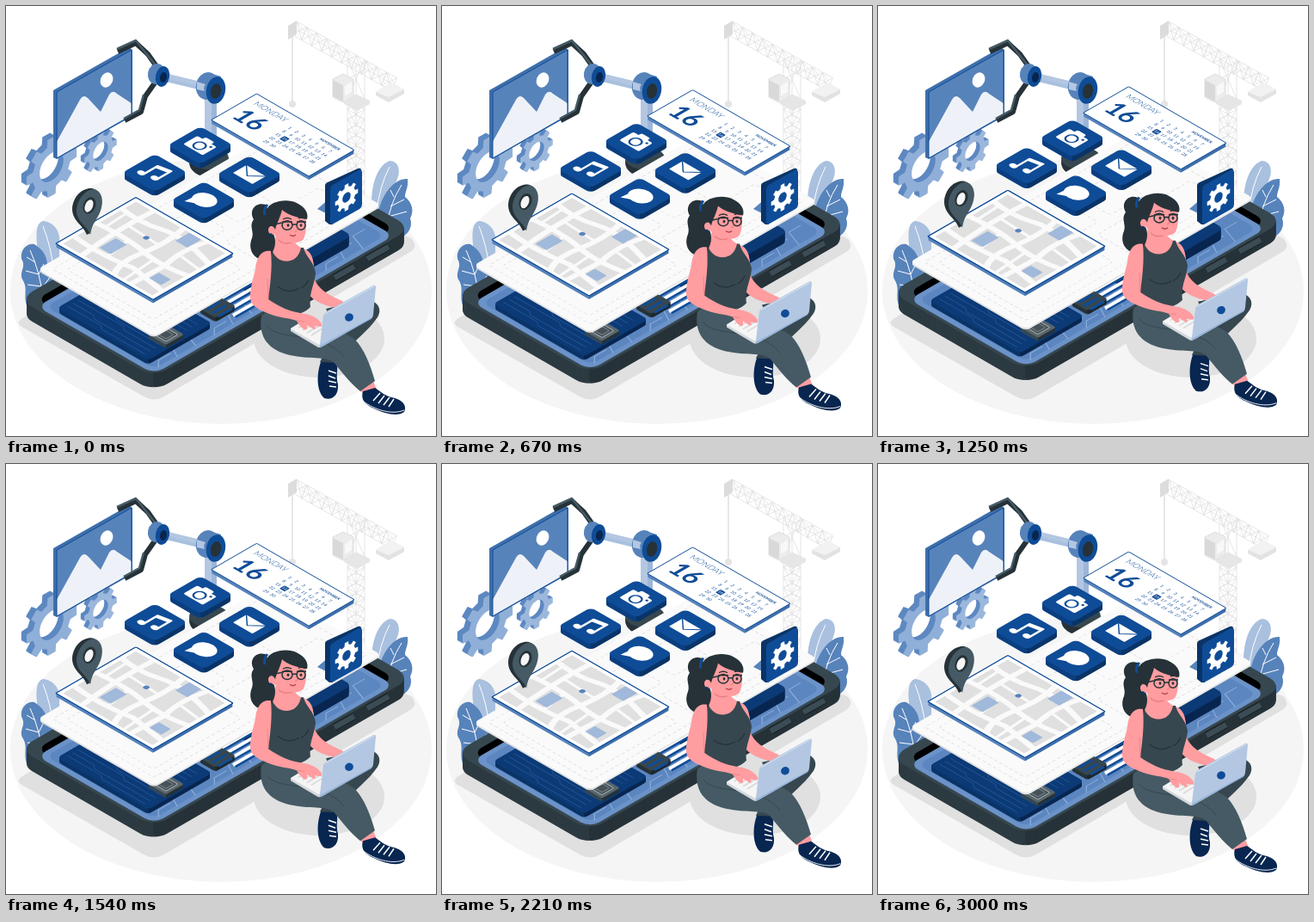
Write an HTML page with a canvas that moves like this. It is 500 by 500 pixels and loops after 3040 ms.

```html
<!DOCTYPE html>
<html lang="en">
<head>
<meta charset="utf-8">
<title>App development</title>
<style>
html, body { margin: 0; width: 100%; height: 100%; overflow: hidden; background: #fff; }
canvas { display: block; width: 500px; height: 500px; }
</style>
</head>
<body>
<canvas id="stage"></canvas>
<script>
const LOOP = 3040, FLOAT = 3000, LIFT = 10;
const NAVY = '#0f4c97', BOARD = '#0b3a76', DEEP = '#0a3467', INK = '#082650', MID = '#5783bb', PALE = '#b3c7e2';
const SLATE = '#37474f', COAL = '#263238', STONE = '#455a64', SKIN = '#ff9da0', GREY = '#e0e0e0';
const TOP = [.866, .5, -.866, .5], WALL = [.866, -.5, 0, 1];

const canvas = document.getElementById('stage');
const c = canvas.getContext('2d');
const dpr = window.devicePixelRatio || 1;
canvas.width = canvas.height = 500 * dpr;

function shape(d, fill, stroke, width = 1) {
  const p = new Path2D(d);
  if (fill) { c.fillStyle = fill; c.fill(p); }
  if (stroke) { c.strokeStyle = stroke; c.lineWidth = width; c.stroke(p); }
}
const line = (d, color, width) => shape(d, null, color, width);

function oval(x, y, rx, ry, fill, tilt = 0, stroke, width = 1) {
  c.beginPath();
  c.ellipse(x, y, rx, ry, tilt, 0, 7);
  if (fill) { c.fillStyle = fill; c.fill(); }
  if (stroke) { c.strokeStyle = stroke; c.lineWidth = width; c.stroke(); }
}

function rect(x, y, w, h, r, fill, stroke, width = 1) {
  c.beginPath();
  c.roundRect(x, y, w, h, r);
  if (fill) { c.fillStyle = fill; c.fill(); }
  if (stroke) { c.strokeStyle = stroke; c.lineWidth = width; c.stroke(); }
}

function plane(m, x, y, draw) {
  c.save();
  c.transform(...m, x, y);
  draw();
  c.restore();
}

// Isometric box; x, y is the far corner of its upper face.
function slab(x, y, w, h, r, depth, top, left, right, edge) {
  const split = x + .866 * (w - h);
  [[left, -100, split + 100], [right, split, 600 - split]].forEach(([fill, from, width]) => {
    c.save();
    c.beginPath();
    c.rect(from, 0, width, 600);
    c.clip();
    for (let k = depth; k > 0; k--) plane(TOP, x, y + k, () => rect(0, 0, w, h, r, fill));
    c.restore();
  });
  plane(TOP, x, y, () => rect(0, 0, w, h, r, top, edge));
}

function gearPath(r, teeth, hole) {
  const p = new Path2D(), step = Math.PI * 2 / teeth;
  for (let i = 0; i < teeth; i++) {
    [[-.3, .76], [-.2, 1], [.2, 1], [.3, .76]].forEach(([o, k]) => {
      const a = (i + o) * step;
      p.lineTo(Math.cos(a) * r * k, Math.sin(a) * r * k);
    });
  }
  p.closePath();
  p.moveTo(hole, 0);
  p.arc(0, 0, hole, 0, 7);
  return p;
}

function gear(x, y, r, teeth, hole, depth, face, side) {
  const p = gearPath(r, teeth, hole);
  for (let k = depth; k >= 0; k--) {
    plane(WALL, x - k * .87, y - k * .5, () => {
      c.fillStyle = k ? side : face;
      c.fill(p, 'evenodd');
    });
  }
}

function crane() {
  let d = '';
  for (let i = 0; i < 10; i++) {
    const x = 338 + i * 11.6, y = 18 + i * 6.6;
    d += `M${x} ${y}l-6 15 17.6 -8.4M${x} ${y}l5.6 21.6 6 -15M${x} ${y}l8 11`;
  }
  d += 'M338 18L455 84M332 33L449 99M341 29L455 94';
  for (let y = 108; y < 222; y += 12) d += `M397 ${y}l10 6 10 -6 -10 -5zl10 18 10 -18M397 ${y + 12}l10 -6 10 6`;
  d += 'M397 62V222M407 66V226M417 62V222M397 62L417 108M417 62L397 108M397 85L417 74';
  line(d, '#e0e0e0', .8);
  shape('M328 23l10 -6v16l-10 6z', '#dcdcdc');
  line('M333 36V111', '#d8d8d8', 1.2);
  oval(333, 114, 4, 4, '#e4e4e4');
  shape('M380 85l12 -6 12 6v20l-12 7 -12 -6z', '#ececec', '#dedede');
  shape('M380 86l12 6v19l-12 -6z', '#d9d9d9');
  shape('M394 93l8 -5v12l-8 5z', '#f8f8f8');
  shape('M393 111l15 -8 15 7v4l-15 8 -15 -8z', '#e6e6e6');
  shape('M430 100l18 -11 15 8v5l-18 10 -15 -8z', '#e2e2e2');
  shape('M430 100l18 -11 15 8 -18 9z', '#f2f2f2');
}

function picture() {
  gear(53, 187, 34, 8, 16, 7, '#8fafd8', '#5d88c1');
  gear(110, 169, 22, 8, 10, 5, '#9bb7dc', '#5d88c1');
  shape('M55 98L143 48 147 51V128L59 178 55 176Z', '#3e6fab');
  shape('M59 100L146 51V127L59 177Z', MID);
  c.save();
  c.clip(new Path2D('M59 100L146 51V127L59 177Z'));
  shape('M55 165L86 109Q90 102 95 107L110 123 120 103Q124 97 129 102L150 116V132L59 182Z', '#eef2f8');
  c.restore();
  line('M59 100L146 51V127L59 177Z', NAVY, 1);
  oval(117, 86, 7, 9, '#fff', .45);
}

function arm() {
  shape('M231 108L245 112V184H231Z', PALE);
  shape('M239 110L245 112V184H239Z', '#9db6d8');
  oval(236, 182, 23, 17, COAL);
  oval(236, 177, 23, 13, SLATE);
  c.lineJoin = 'round';
  line('M130 53L151 43 165 56 177 73', COAL, 6);
  line('M129 50L151 40 174 69', STONE, 2.5);
  line('M138 133L157 123 162 105 174 88', COAL, 6);
  line('M137 131L155 121 160 103', STONE, 2.5);
  line('M185 83L235 95', '#a9c0df', 9);
  line('M186 81L235 93', PALE, 5);
  oval(175, 79, 10, 12, MID, .2);
  oval(182, 82, 8, 12, NAVY, .2);
  oval(183, 83, 4, 6, INK, .2);
  oval(234, 93, 13, 16, MID, .2);
  shape('M237 78L250 82 247 113 232 108Z', MID);
  oval(244, 98, 11, 16, NAVY, .2);
  oval(244, 99, 6, 9, COAL, .2);
  shape('M222 88L232 91Q229 95 231 99L222 97Z', PALE);
}

function leaves() {
  shape('M38 290C34 268 34 251 44 250C56 252 64 262 62 276V310H50Z', '#a9c0df');
  line('M43 256Q52 278 56 310', '#fff');
  shape('M24 348C20 336 26 328 19 318C15 308 24 304 18 294C16 282 26 275 33 277C44 284 48 292 48 302C58 306 60 320 58 345Z', MID);
  line('M28 284Q40 310 44 345M34 298L24 292M38 312L23 308M41 326L25 324M38 312L44 300M42 328L52 314', '#fff');
  shape('M425 235C424 208 432 185 446 180C457 180 459 192 455 201C451 213 440 222 436 240Z', '#a9c0df');
  line('M446 187Q434 210 431 240', '#fff');
  shape('M432 245C436 218 452 200 467 201C468 212 464 215 464 222C472 228 475 238 470 247C473 256 469 263 462 268L440 255Z', MID);
  line('M460 208Q446 230 443 256M451 222L447 214M447 233L463 225M444 245L466 239', '#fff');
}

function phone() {
  slab(315, 167.8, 181, 346.5, 18, 17, SLATE, '#2c3a41', COAL);
  line('M382 316L405 303M420 294L445 280', '#1c262b', 9);
  line('M382 316L405 303M420 294L445 280', '#3c4c54', 6.5);

  c.save();
  plane(TOP, 315, 179.8, () => {
    rect(0, 0, 157, 322.5, 12, '#000');
    c.clip();
  });
  plane(TOP, 315, 188.5, () => {
    rect(0, 0, 157, 322, 12, '#6b93c9');
    rect(6, 6, 145, 310, 10, '#5c86c0');
    c.beginPath();
    for (let i = 0; i < 12; i++) {
      c.moveTo(130 + i % 3 * 7, 12 + i * 25);
      c.lineTo(130 + i % 3 * 7, 28 + i * 25);
      c.lineTo(152, 36 + i * 25);
    }
    c.strokeStyle = '#8fb0da';
    c.lineWidth = 1;
    c.stroke();
  });
  slab(134, 308, 122, 86, 5, 5, BOARD, DEEP, INK);
  plane(TOP, 134, 308, () => {
    c.beginPath();
    for (let i = 0; i < 11; i++) {
      const v = 7 + i * 7, bend = 30 + i * 17 % 50;
      c.moveTo(5, v);
      c.lineTo(bend, v);
      c.lineTo(bend + 5, v + 4);
      c.lineTo(113, v + 4);
    }
    c.strokeStyle = '#24579b';
    c.lineWidth = .8;
    c.stroke();
  });
  slab(352, 238, 58, 125, 7, 11, BOARD, DEEP, INK);
  for (let i = 0; i < 4; i++) {
    const x = 240 + i * 8, y = 346 + i * 4.6;
    line(`M${x} ${y}l75 -43`, '#fff', 4);
    line(`M${x + 3} ${y + 1.8}l75 -43`, NAVY, 2.4);
  }
  slab(248, 338, 22, 27, 3, 5, SLATE, COAL, '#1d272c');
  for (let i = 0; i < 3; i++) line(`M${233 + i * 7} ${353 + i * 4}l16 -9`, NAVY, 3);
  slab(186, 370, 24, 24, 2, 4, '#59666c', SLATE, COAL);
  plane(TOP, 186, 370, () => {
    rect(4, 4, 16, 16, 1, '#465258', '#b8c0c4', .8);
    rect(7, 7, 10, 10, 1, null, '#8f999e', .7);
  });
  c.restore();
}

function sheet() {
  slab(301, 153.5, 156, 305, 6, 2, '#fafafa', GREY, '#e6e6e6');
  plane(TOP, 301, 153.5, () => {
    c.setLineDash([4, 3]);
    rect(10, 10, 136, 285, 3, null, '#dedede', .9);
    rect(20, 168, 116, 118, 3, null, '#dedede', .9);
    rect(94, 22, 42, 125, 3, null, '#dedede', .9);
    [[34, 70], [34, 132]].forEach(([u, v]) => rect(u, v, 46, 46, 4, null, '#dedede', .9));
    c.setLineDash([]);
  });
}

function map() {
  const x = 151, y = 222.5;
  slab(x, y, 130.5, 107.5, 1, 4, '#fff', MID, '#3e6fab', NAVY);
  plane(TOP, x, y, () => {
    rect(5, 5, 120, 98, 1, GREY);
    c.clip();
    line('M0 22Q30 28 54 20T131 30M0 57Q40 52 68 58T131 55M0 86Q38 92 80 84L131 92M28 0Q24 50 32 108M67 0Q75 30 69 60T78 108M101 0Q91 30 99 60L97 108', '#fafafa', 6.5);
    line('M28 38L70 40M45 57L50 90M99 38L130 42M12 22L14 57M84 57L88 108', '#fafafa', 3.5);
    rect(34, 61, 15, 22, 1, '#a1b9da');
    rect(77, 5, 16, 19, 1, '#a1b9da');
    rect(103, 72, 16, 13, 1, '#a1b9da');
    oval(54, 40, 3, 3, MID);
  });
  plane(TOP, x, y, () => rect(0, 0, 130.5, 107.5, 1, null, NAVY, 1.2));
}

function pin() {
  shape('M94 266C90 255 77 250 77 236C78 220 90 211 100 212C110 214 113 226 110 236C106 248 100 252 98 264Z', COAL);
  shape('M98 266C95 256 82 251 82 238C83 223 94 213 102 213C112 215 114 227 110 238C106 249 100 252 98 266Z', STONE);
  oval(97, 232, 7, 10, COAL, .4);
  oval(96.5, 232.5, 4.5, 7.5, '#f5f5f5', .4);
}

function tile(x, y, icon) {
  slab(x, y - 22, 44, 44, 6, 6, NAVY, '#0b3f80', DEEP);
  plane(TOP, x, y, icon);
}

function icons() {
  tile(226, 162, () => {
    rect(-13, -9, 26, 19, 2, '#fff');
    rect(-6, -13, 12, 6, 2, '#fff');
    oval(0, 1, 7, 7, NAVY);
    oval(0, 1, 5, 5, '#fff');
    oval(9, -5, 1.5, 1.5, NAVY);
  });
  tile(173, 194, () => {
    line('M-6 9V-10L9 -13V6', '#fff', 2.6);
    line('M-6 -8L9 -11', '#fff', 4);
    oval(-9, 9, 4.5, 3.5, '#fff');
    oval(6, 6, 4.5, 3.5, '#fff');
  });
  tile(283, 196, () => {
    rect(-13, -9, 26, 18, 1, '#fff');
    line('M-13 -9L0 3 13 -9', NAVY, 1.2);
  });
  tile(230, 226, () => {
    oval(0, -1, 13, 11, '#fff');
    shape('M-11 4L-12 14 -2 9Z', '#fff');
  });
}

function label(text, x, y, size, weight = 400, align = 'left', color = NAVY) {
  c.font = `${weight} ${size}px Lato, sans-serif`;
  c.textAlign = align;
  c.fillStyle = color;
  c.fillText(text, x, y);
}

function calendar() {
  slab(291.5, 102, 131, 61, 1, 4, '#fff', MID, '#3e6fab', NAVY);
  c.textBaseline = 'middle';
  plane(TOP, 330, 142, () => {
    for (let day = 1; day <= 30; day++) {
      const u = (day - 1) % 7 * 9, v = Math.floor((day - 1) / 7) * 8;
      if (day === 16) rect(u - 3.5, v - 3.5, 7, 7, 1, NAVY);
      label(day, u, v, 5.2, 400, 'center', day === 16 ? '#fff' : NAVY);
    }
  });
  plane(TOP, 283, 133, () => label('16', 0, 0, 29, 700, 'center'));
  c.textBaseline = 'alphabetic';
  plane(TOP, 364, 155, () => label('NOVEMBER', 0, 0, 4.6, 700));
  plane(TOP, 287, 114, () => label('MONDAY', 0, 0, 9.6, 300));
}

function settings() {
  shape('M362 236L376 224V242L370 240Z', MID);
  shape('M371 209Q371 206 374 205L409 189Q413 188 413 191L380 214V254L376 254 371 250Z', DEEP);
  shape('M377 213Q377 210 380 208L410 191Q414 190 414 193V231Q414 234 411 236L381 253Q377 255 377 251Z', NAVY);
  gear(396, 222.5, 15.5, 8, 5.5, 0, '#fff');
}

function head() {
  shape('M302 231C290 227 282 238 288 248C282 256 289 262 286 270C280 284 290 297 302 294C314 288 316 270 309 262C304 250 307 240 302 231Z', COAL);
  shape('M309 246C310 236 330 232 347 240C350 250 350 262 346 271C341 277 330 276 322 272C314 270 310 264 309 258Z', SKIN);
  shape('M303 237C306 227 327 223 338 229C348 234 352 241 350 248C338 246 326 242 321 237C319 246 315 252 313 260C304 256 298 247 303 237Z', COAL);
  line('M304 231Q299 236 301 243', NAVY, 3);
  oval(309, 261, 4, 5, SKIN, -.2);
  oval(308, 266, 1.8, 1.8, DEEP);
  line('M322 248Q327 245 332 248M340 247Q344 245 348 247', COAL, 1.4);
  oval(327, 255, 6, 5.3, null, 0, COAL, 1.5);
  oval(343, 255, 5, 5.2, null, 0, COAL, 1.5);
  line('M312 254L321 252M321 251H333M333 254H338M338 251H349', COAL, 1.6);
  oval(328, 255, 1.4, 1.8, COAL);
  oval(343, 255, 1.4, 1.8, COAL);
  line('M337 256Q341 262 336 262', '#e87378', 1);
  line('M330 266Q334 269 337 266', '#b7434b', 1.4);
}

function woman() {
  // legs
  shape('M372 352L418 342C432 342 438 352 432 362C421 378 405 389 398 399L385 420 365 414C372 400 379 388 386 380Z', SLATE);
  shape('M366 414C361 428 361 448 370 456C380 459 387 452 386 440C383 430 387 422 384 415Z', INK);
  line('M375 424L384 427M375 430L383 433M375 436L384 438M376 442L384 443', '#fff', 1.5);
  shape('M411 446L427 436 431 446 418 454Z', SKIN);
  shape('M297 360C293 385 305 400 330 406C354 411 371 407 381 414C392 428 402 440 412 448L429 436C424 418 416 398 406 388C398 381 385 378 370 374L305 354Z', STONE);
  line('M304 372C312 385 340 382 366 390Q384 396 393 408M386 382Q400 376 412 364', SLATE, 1);
  shape('M415 448C412 458 418 464 428 468C440 474 456 478 463 472C467 464 460 457 448 455C440 453 434 447 429 444Z', INK);
  line('M416 460C428 469 448 476 463 470', '#e8eef6', 1);
  line('M427 459L435 450M433 462L440 453M439 464L446 455M445 466L451 457', '#fff', 1.5);

  // body
  shape('M350 286C358 291 359 303 358 316C362 328 374 336 391 343C396 347 392 351 384 351C371 349 357 343 351 334Z', SKIN);
  shape('M305 285C312 278 315 270 313 260L334 268C334 276 340 280 350 284C357 289 358 298 357 306L320 312Z', SKIN);
  line('M317 272Q324 279 334 274', '#e87f84', 1.4);
  shape('M309 281C311 300 339 304 343 281L346 281C348 291 358 297 360 310C359 325 352 332 354 350C342 363 312 364 302 354C300 336 307 318 303 300L306 282Z', SLATE);
  line('M316 326Q328 336 341 328M352 318Q349 325 343 328', COAL, 1.2);
  head();

  // laptop and near arm
  shape('M331 375L352 362 376 374 366 397 363 397 331 378Z', '#d5d9de');
  shape('M331 375L352 362 376 374 364 394Z', '#f5f5f5');
  line('M340 374L353 366M345 377L359 369M350 380L364 372M355 383L368 375', '#d8d8d8', 1.5);
  shape('M308 285C296 283 291 294 290 306C286 322 282 336 285 344C288 351 300 356 312 360C322 363 330 363 338 366C342 373 347 378 350 376L350 371 358 376Q361 376 359 372L366 373Q369 372 366 368C360 360 350 358 342 357C330 355 318 350 305 341C307 325 310 305 308 285Z', SKIN);
  line('M305 341L304 318M338 366L347 367', '#e87f84', .8);
  shape('M369 360Q370 357 373 355L427 325Q430 324 430 327L427 359Q427 362 424 364L368 396Q364 398 365 394Z', PALE);
  line('M371 358L428 326', '#d8e3f1', 1);
  line('M365 396L425 363', '#8daed7', 1.2);
  oval(399, 362, 5, 4.6, NAVY, -.5);
}

function ground() {
  oval(250, 331.5, 245, 154.5, '#f5f5f5');
  shape('M19 363L300 200 471 270Q480 279 470 286L184 454Q172 461 160 454L20 374Q10 369 19 363Z', GREY);
  oval(364, 387, 76, 45, GREY);
}

function frame() {
  const t = Math.min(performance.now() % LOOP, FLOAT);
  const rise = LIFT * (1 - Math.abs(1 - 2 * t / FLOAT));
  c.setTransform(dpr, 0, 0, dpr, 0, 0);
  c.fillStyle = '#fff';
  c.fillRect(0, 0, 500, 500);
  [ground, crane, picture, arm, leaves].forEach(draw => draw());
  c.save();
  c.translate(0, -rise);
  [phone, sheet, map, pin, icons, calendar].forEach(draw => draw());
  c.restore();
  settings();
  c.save();
  c.translate(0, -rise);
  woman();
  c.restore();
  requestAnimationFrame(frame);
}
frame();
</script>
</body>
</html>
```
